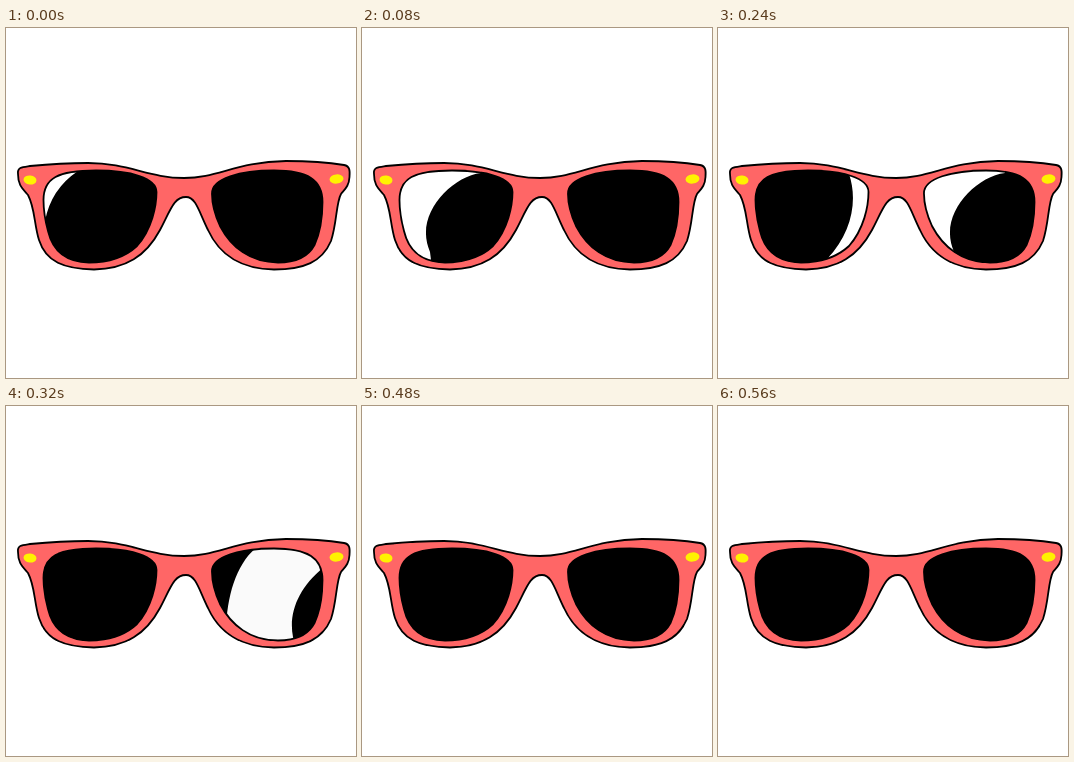
An HTML page for the animation above (0.64 s loop, 350 by 350 pixels).

```html
<!DOCTYPE html>
<html lang="en">
<head>
<meta charset="utf-8">
<title>Sunglasses</title>
<style>
  html, body { margin: 0; width: 100%; height: 100%; overflow: hidden; background: #fff; }
  svg { display: block; width: 100vw; height: 100vh; }
</style>
</head>
<body>
<svg viewBox="0 0 350 350">
  <defs>
    <path id="lensL" d="M37.5 172C37.5 150 52 142.5 90 142.5C125 142.5 150.5 150 150.5 164C150.5 178 146 201 131 218C117 231 100 234.5 83 234.5C60 234 47 224 42 203C39 192 37.5 182 37.5 172Z"/>
    <path id="lensR" d="M206 166C205 150 235 142.5 268 142.5C302 142.5 316.5 152 316.5 174C316.5 190 314.5 204 308.5 217C301 231 287 234.5 272 234.5C244 234.5 225 219 214 198C208.5 186 206 176 206 166Z"/>
    <clipPath id="clipL"><use href="#lensL"/></clipPath>
    <clipPath id="clipR"><use href="#lensR"/></clipPath>
  </defs>

  <path fill="#ff6666" stroke="#000" stroke-width="1.8" d="M12 146C11 139 17 139 24 138C45 136 65 135 82 135C122 135 143 150 178 150C212 150 230 134 280 133C303 133 320 134 338 137C344 138 344 143 343.5 149C343 158 339 161 335 166C330 175 331 195 325 213C316 234 298 241.5 268 241.5C233 241 213 226 202 202C193 184 190 169 180 169C168 169 165 181 154 202C140 228 120 241 88 241.5C58 241 40 234 33 212C28 196 29 180 22 167C16 160 12 157 12 146Z"/>
  <g fill="#fff200">
    <ellipse cx="24" cy="152" rx="6.5" ry="4.5" transform="rotate(6 24 152)"/>
    <ellipse cx="330.5" cy="151" rx="7" ry="4.6" transform="rotate(-6 330.5 151)"/>
  </g>

  <use href="#lensL"/>
  <use href="#lensR"/>
  <g clip-path="url(#clipL)"><path id="sheenL"/></g>
  <g clip-path="url(#clipR)"><path id="sheenR" transform="translate(168)"/></g>
  <g fill="none" stroke="#000" stroke-width="1.8">
    <use href="#lensL"/>
    <use href="#lensR"/>
  </g>
</svg>
<script>
  const STEP = 80, STEPS = 8, RIGHT_DELAY = 2;

  // Poses of the reflection as it sweeps across one lens
  const sweep = [
    { d: "M72 143Q45 161 39 193L20 193V130H72Z", fill: "#fff" },
    { d: "M119 145C93 148 63 177 64 206Q64 214 68 224L70 240H20V130H119Z", fill: "#fff" },
    { d: "M83 141C62 158 53 190 52 224L52 240H121L119 231C114 205 126 180 151 160V130H83Z", fill: "#fafafa" },
    { d: "M131 146C140 172 134 205 109 231L110 245H170V130H131Z", fill: "#fff" }
  ];
  const sheenL = document.getElementById("sheenL");
  const sheenR = document.getElementById("sheenR");

  function setSheen(path, pose) {
    const { d, fill } = sweep[pose] || { d: "", fill: "none" };
    path.setAttribute("d", d);
    path.setAttribute("fill", fill);
  }

  function draw() {
    const step = Math.floor(performance.now() / STEP) % STEPS;
    setSheen(sheenL, step);
    setSheen(sheenR, step - RIGHT_DELAY);
    requestAnimationFrame(draw);
  }
  draw();
</script>
</body>
</html>
```
